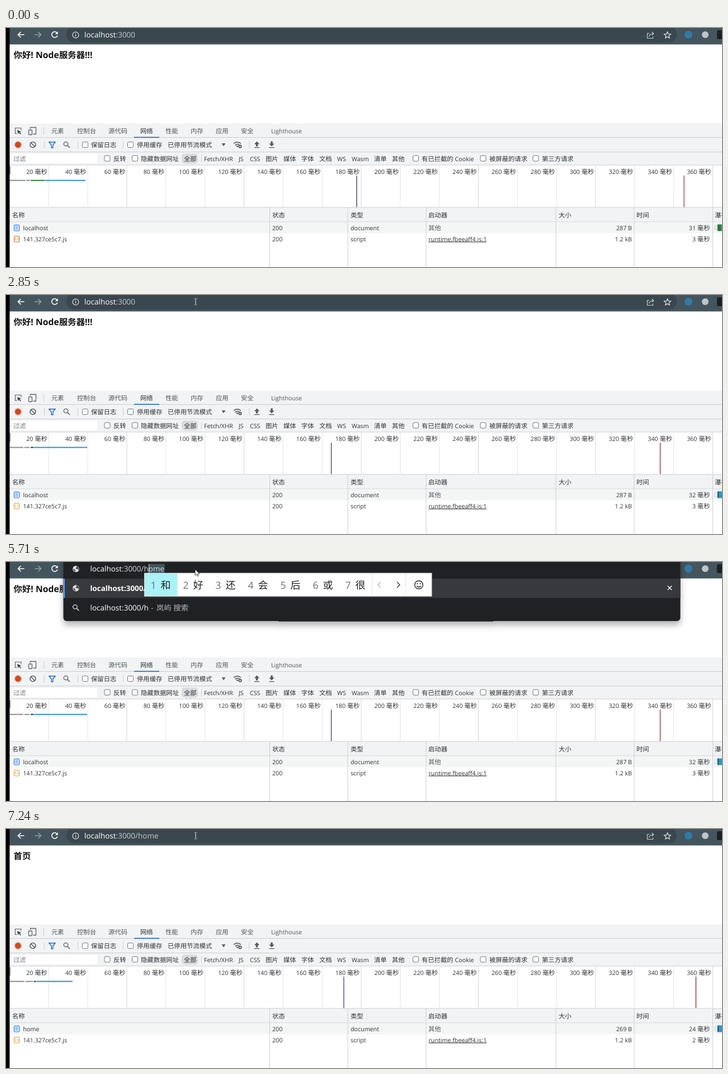
An HTML page for the animation above (8000 ms loop, 1280 by 429 pixels).

```html
<!DOCTYPE html>
<html lang="zh-CN">
<head>
<meta charset="utf-8">
<title>localhost:3000</title>
<style>
html, body { margin: 0; width: 100%; height: 100%; overflow: hidden; background: #fff; }
svg { display: block; width: 1280px; height: 429px; }
text { font-family: "Open Sans", "Noto Sans CJK SC", sans-serif; white-space: pre; text-rendering: geometricPrecision; }
</style>
</head>
<body>
<svg id="stage" viewBox="0 0 1280 429">
  <g id="base"></g>
  <g id="net"></g>
  <g id="page"></g>
  <g id="list"></g>
  <g id="bar"></g>
  <g id="ime"></g>
  <g id="pointer"></g>
  <rect width="6.5" height="429" fill="#000"/>
</svg>
<script>
const LOOP = 8000, INK = '#303236', RULE = '#cbced2', PALE = '#e8eaed', BLUE = '#a8cbf8';
const $ = id => document.getElementById(id);

// ---- drawing helpers
const rect = (x, y, w, h, fill, more = '') =>
  `<rect x="${x}" y="${y}" width="${w}" height="${h}" fill="${fill}" ${more}/>`;
const line = (d, color, width = 1, more = '') =>
  `<path d="${d}" fill="none" stroke="${color}" stroke-width="${width}" ${more}/>`;
const shape = (d, fill, more = '') => `<path d="${d}" fill="${fill}" ${more}/>`;
const dot = (x, y, r, fill, more = '') => `<circle cx="${x}" cy="${y}" r="${r}" fill="${fill}" ${more}/>`;
const ring = (x, y, r, color, width = 1.2) => dot(x, y, r, 'none', `stroke="${color}" stroke-width="${width}"`);
const vline = (x, y1, y2, color, width = 1) => line(`M${x} ${y1}V${y2}`, color, width);

// Latin and Chinese runs have slightly different sizes
const runs = (s, han) => s.split(/([\u3000-\u9fff\uff00-\uffef]+)/)
  .map((part, i) => i % 2 ? `<tspan font-size="${han}">${part}</tspan>` : part).join('');
const text = (x, y, s, { size = 10.7, han = 11.35, fill = INK, more = '' } = {}) =>
  `<text x="${x}" y="${y}" font-size="${size}" fill="${fill}" ${more}>${runs(s, han)}</text>`;
const label = (x, mid, s, fill = INK) => text(x, mid + 4, s, { fill });
const labelEnd = (x, mid, s, fill = INK) => text(x, mid + 4, s, { fill, more: 'text-anchor="end"' });

const ctx = document.createElement('canvas').getContext('2d');
const URL_SIZE = 13.5;
const urlWidth = s => {
  ctx.font = `${URL_SIZE}px "Open Sans", sans-serif`;
  ctx.textRendering = 'geometricPrecision';
  return ctx.measureText(s).width;
};

// ---- icons
const checkbox = (x, y) => rect(x + .5, y + .5, 10, 10, '#fff', 'rx="2" stroke="#767676"');
const lens = (x, y, c) => ring(x - 1.5, y - 1.5, 3.7, c, 1.3) + line(`M${x + 1.3} ${y + 1.3}l4.2 4.2`, c, 1.5);
const cross = (x, y, r, c, w) => line(`M${x - r} ${y - r}l${2 * r} ${2 * r}m0 ${-2 * r}l${-2 * r} ${2 * r}`, c, w);
const globe = (x, y) => dot(x, y, 5.8, '#dfe2e5') +
  shape(`M${x - 4.6} ${y - 1}l3 2.5 1.4 3.4-2.4-.6-2-2.6zM${x + .5} ${y - 5}l.6 2.6-2 1.2 1.6 1.2 2.6.2 1.6 2 .6-3.4-2.2-3.4z`, '#4b4e52');
const arrow = (x, y, dir, c) =>
  line(`M${x - 5.5 * dir} ${y}h${11 * dir}m${-5 * dir} -5l${5 * dir} 5l${-5 * dir} 5`, c, 1.6);
const reload = () => line('M91.6 9.2A5.2 5.2 0 1 0 92 13.6', '#fff', 1.6) + shape('M92.7 6.2v4.8h-4.8z', '#fff');
const info = () => ring(124.5, 12.5, 5.4, '#dfe5e8') + line('M124.5 11.6v3.6M124.5 9.3v1.3', '#dfe5e8', 1.3);
const share = () => line('M1150 9.5h-3.5v9h10v-3', '#c6ced2', 1.2) +
  line('M1149.5 15.5c.5-4 3-5.500 8-5.500m-3-3l3.300 3-3.300 3', '#c6ced2', 1.2);
const star = () => {
  const pts = Array.from({ length: 10 }, (_, i) => {
    const a = i * Math.PI / 5 - Math.PI / 2, r = i % 2 ? 2.8 : 6.2;
    return (1182.5 + r * Math.cos(a)).toFixed(1) + ' ' + (13 + r * Math.sin(a)).toFixed(1);
  });
  return line('M' + pts.join('L') + 'z', '#e6ebed', 1.2);
};
const fileIcon = (y, script, tint) => {
  const c = script ? tint : '#1a73e8';
  return rect(14.6, y - 5, 9, 10.5, '#fff', `rx="1.500" stroke="${c}" stroke-width="1.200"`) + (script
    ? line(`M18 ${y - 1.5}l-1.700 1.800 1.700 1.800m2.200 -3.600l1.700 1.800-1.700 1.800`, c)
    : line(`M16.5 ${y - 2.5}h5m-5 2.500h5m-5 2.500h5`, c));
};

// ---- unchanging browser and tool panels
function drawBase() {
  let s = rect(0, 0, 1280, 429, '#fff') + rect(0, 0, 1280, 29.5, '#45555d');
  s += arrow(27, 12, -1, '#fff') + arrow(57, 12, 1, '#93a1a8');
  s += dot(1220, 12, 7, '#2f7ba8') + dot(1250, 12, 6, '#bcc5c9') + rect(1271, 4, 16, 16, '#1d2023', 'rx="3"');

  s += rect(0, 171.5, 1280, 74.5, '#f1f3f4') + rect(0, 322, 1280, 26, '#f1f3f4');
  for (const y of [196.5, 222.5, 246, 322, 348]) s += line(`M0 ${y}H1280`, RULE);

  const tabs = { 81: '元素', 127: '控制台', 183: '源代码', 285: '性能', 330: '内存', 375: '应用', 420: '安全', 474: 'Lighthouse' };
  for (const x in tabs) s += label(x, 185, tabs[x], '#53575b');
  s += label(240, 185, '网络') + rect(229, 195.5, 45, 1.6, '#1a62c8');
  s += line('M19.500 189.500h-3v-10h10.500v3.500', '#5f6368', 1.2) + shape('M20 183l7.500 3-3 1 2.500 3-1.300 1-2.500-3-1.700 2.500z', '#45494d');
  s += line('M43.500 181v-2.500h10v12h-5', '#5f6368', 1.3) + rect(40.5, 183, 6, 8.5, '#f1f3f4', 'rx="1" stroke="#5f6368" stroke-width="1.300"');

  s += dot(21.5, 209.5, 7, '#efc9bd') + dot(21.5, 209.5, 5.4, '#cf4a22');
  s += ring(48, 209.5, 5, '#55595d', 1.5) + line('M44.500 206l7 7', '#55595d', 1.5);
  s += line('M77 204.700h11l-4.200 5.300v5h-2.600v-5z', '#1a66d0', 1.4) + lens(108.5, 209.5, '#55595d');
  s += checkbox(136, 204) + label(152, 209.5, '保留日志') + checkbox(217, 204) + label(234, 209.5, '停用缓存');
  s += label(289, 209.5, '已停用节流模式') + shape('M385.500 207h7l-3.500 5.500z', '#5f6368');
  s += line('M407 207.500q6.500-5.500 13 0m-10.500 2.800q4-3.200 7.500-.5', '#4d5155', 1.5) +
    shape('M411 211.500l3 3 1-3.500z', '#4d5155') + ring(418.5, 212.5, 2.2, '#4d5155', 1.8);
  s += shape('M448.500 203.500l4.700 5h-3v4h-3.400v-4h-3zM443.800 214h9.400v1.300h-9.400z', '#55595d');
  s += shape('M475 212.500l4.700-5h-3v-4h-3.400v4h-3zM470.300 214h9.400v1.300h-9.400z', '#55595d');
  s += vline(67.5, 178, 192, RULE);
  for (const x of [68.5, 128.5, 209.5, 435]) s += vline(x, 203, 216, RULE);

  s += rect(10, 226, 153, 17, '#fff') + label(13, 234.5, '过滤', '#75797d');
  s += rect(314, 225.5, 29, 18, '#dadcde', 'rx="5"') + vline(349.5, 228, 241, RULE);
  for (const x of [175.5, 225, 727, 847.5, 941.5]) s += checkbox(x, 228.5);
  const kinds = {
    192: '反转', 241: '隐藏数据网址', 318: '全部', 354: 'Fetch/XHR', 416: 'JS', 436: 'CSS', 464: '图片', 496: '媒体',
    528: '字体', 560: '文档', 592: 'WS', 618: 'Wasm', 658: '清单', 690: '其他',
    743: '有已拦截的 Cookie', 864: '被屏蔽的请求', 958: '第三方请求'
  };
  for (const x in kinds) s += label(x, 234.5, kinds[x]);

  const heads = { 11: '名称', 476: '状态', 616: '类型', 755: '启动器', 988: '大小', 1127: '时间', 1267: '瀑布' };
  for (const x in heads) s += label(x, 336, heads[x]);
  return s;
}

// ---- network log: times in ms, bars as [from, to, colour]
const doc = (name, size, time, status = '200') => [name, status, 'document', '其他', size, time];
const js = time => ['141.327ce5c7.js', '200', 'script', 'runtime.fbeeaff4.js:1', '1.2 kB', time];
const GREY = '#8a8d90', SKY = '#2b8fd0', GREEN = '#2a7a32';
const logs = [
  { dcl: 177.7, load: 345.3, script: 399, tint: '#e0691e', cols: ['#45546c', '#b0564c'], body: GREEN, head: 6,
    bars: [[0, 8, GREY], [8.4, 10.4, GREY], [10.7, 18, GREEN], [18.2, 38.8, SKY]],
    rows: [doc('localhost', '287 B', '31 毫秒'), js('3 毫秒')] },
  { dcl: 164.7, load: 333.1, script: 391, tint: '#dfa13a', cols: ['#504f9c', '#a4454a'], body: '#20505c', head: 2,
    bars: [[0, 7, GREY], [7.5, 10.2, GREY], [10.7, 12.2, '#1d3a2b'], [12.4, 39.7, SKY]],
    rows: [doc('localhost', '287 B', '32 毫秒'), js('3 毫秒')] },
  { dcl: 171.1, load: 351.4, script: 400, tint: '#dfa13a', cols: ['#5654bd', '#8f4044'], body: '#20505c', head: 2,
    bars: [[0, 7.6, GREY], [8.1, 11.9, GREY], [12.4, 13.7, '#1d4a2b'], [13.9, 32.2, SKY]],
    rows: [doc('home', '269 B', '24 毫秒'), js('2 毫秒')] }
];

function drawNet({ log, unit, gap, extra, seen }) {
  const L = logs[log], at = ms => 6.5 + ms / unit * gap, wide = unit > 20;
  const bar = (from, to, color) => rect(at(from), 272.6, at(to) - at(from), 2, color);
  let s = '';
  for (let k = 1; at((k - 1) * unit) < 1280; k++) {
    const x = at(k * unit);
    s += vline(x, 246, 321.5, k % 3 ? '#e3e5e7' : '#d3d5d8') + labelEnd(x - 2.5, 258, k * unit + ' 毫秒');
  }
  s += rect(6, 248, 2.2, 15, '#9b9ea1');
  if (wide) s += bar(7, 38, '#3f8fd6') + rect(at(L.script), 270, 1.2, 1.6, '#7aa6d4');
  else for (const b of L.bars) s += bar(...b);
  const cols = wide ? [log ? '#45466c' : '#3c7bd0', log ? '#b4573a' : '#93483f'] : L.cols;
  if (seen >= L.dcl) s += vline(at(L.dcl), 265, 321.5, cols[0], 1.5);
  if (seen >= L.load) s += vline(at(L.load), 265, 321.5, cols[1], 1.5);

  const rows = L.rows.slice(0, seen >= L.script ? 2 : 1).concat(extra ? [extra] : []);
  rows.forEach(([name, status, type, from, size, time], i) => {
    const y = 358.5 + 20 * i, script = type === 'script';
    if (i % 2 === 0) s += rect(7, y - 10, 1273, 20, '#f4f5f5');
    s += fileIcon(y, script, L.tint) + label(30.5, y, name) + label(476, y, status) + label(616, y, type);
    s += script ? text(755.5, y + 4, from, { more: 'text-decoration="underline"' }) : label(755, y, from, '#55595d');
    s += labelEnd(1119, y, size) + labelEnd(1258.5, y, time, time === '待处理' ? '#55595d' : INK);
  });
  for (const x of [471.5, 611, 751, 983, 1123, 1263.5]) s += vline(x, 322, 429, RULE);

  if (!wide) s += rect(1267.5, 355, 3.5, 7, '#fff', `stroke="#c3c6c9"`) +
    rect(1272, 352.5, L.head, 12, L.body) + rect(1272 + L.head, 352.5, 10, 12, '#1d9bdb');
  else if (log) s += rect(1269.5, 352.5, 3, 11, '#3f8fd6') + vline(1273.5, 349, 429, '#79a7de');
  else s += vline(1271, 349, 429, '#4a86d0', 1.3) + vline(1274, 349, 429, '#a8625a', 1.3) +
    rect(1268, 355, 2, 7, '#c3d6ea') + rect(1275, 373, 2.5, 11, '#4a90d8');
  return s;
}

// ---- address bar
function drawBar({ url, focus, caret, sel, edit, busy, press }) {
  let s = busy ? cross(87, 12, 4.7, '#fff', 1.6) : reload();
  s += rect(108, -3, 1091, 29, focus ? '#202124' : '#3a474e',
    `rx="14" ${focus && !edit ? 'stroke="#a5c6ee" stroke-width="1.800"' : ''}`);
  s += edit ? globe(125, 12.5) : info() + share() + star();
  const x = edit ? 150.5 : 140;
  if (sel) {
    const skip = sel[0] ? urlWidth(url.slice(0, sel[0])) + 1 : 0;
    s += rect(x + skip, 3.5, urlWidth(url) + .5 - skip, 18, '#3d555d');
  }
  const gray = edit ? '#d3d7da' : '#c3cbcf';
  s += `<text x="${x}" y="17" font-size="${URL_SIZE}" fill="#fff">localhost<tspan fill="${gray}">${url.slice(9)}</tspan></text>`;
  if (caret != null) s += vline(x + urlWidth(url.slice(0, caret)) + .8, 4, 20, '#e4e7e9', 1);
  if (press) s += dot(337.5, 12, 11.3, '#938f17');
  return s;
}

// ---- suggestions: each row is [icon, [text, style] ...]
const HOST = 'localhost:3000';
const styles = {
  b: 'font-weight="700" font-size="13.300" fill="#fff"', n: 'fill="#fff"', g: 'fill="#b4b8bc"',
  dash: 'fill="#b4b8bc" letter-spacing=".9"',
  B: `font-weight="700" font-size="13.300" fill="${BLUE}"`, l: `fill="${BLUE}"`
};
const DASH = [' - ', 'dash'];
const seek = q => ['lens', [q, 'n'], DASH, ['岚屿 搜索', 'g']];
const page = p => ['globe', [HOST + '/', 'b'], [p, 'n'], DASH, [HOST + '/', 'B'], [p, 'l']];
const pick = p => ['globe', [HOST + p, 'b'], DASH, [HOST + p, 'B']];
const rootList = [pick(''), seek(HOST + '/'), page('home'), page('list')];
const homeList = q => [pick('/home'), seek(HOST + q)];

function drawList({ list, fade }) {
  if (!list) return '';
  const bottom = list.length > 2 ? 176 : 106;
  let s = rect(102.5, -20, 1103, bottom + 20, '#202124', 'rx="6"') +
    rect(102.5, 30, 1103, 34.5, '#38393c') + rect(102.5, 30, 2.6, 34.5, '#5b9df5');
  if (bottom < 150) s += rect(487, 105.5, 384, 1.2, '#17181a');
  list.forEach(([icon, ...parts], i) => {
    const y = 47 + 35 * i;
    s += icon === 'lens' ? lens(125, y, '#dfe2e5') : globe(125, y);
    s += `<text x="150.500" y="${y + 5}" font-size="13.500">` +
      parts.map(([t, k]) => `<tspan ${styles[k]}>${t}</tspan>`).join('') + '</text>';
  });
  s += cross(1186.5, 46.5, 3.7, '#fff', 1.4);
  return `<g opacity="${fade}" style="filter:drop-shadow(0 7px 6px rgba(0,0,0,.3))">${s}</g>`;
}

function drawIme({ ime }) {
  if (!ime) return '';
  let s = rect(247.5, 20, 513.5, 41.5, '#fff', 'stroke="#d5d7d9"') + rect(248, 20.5, 58, 40.5, '#aaf2f6');
  [...'和好还会后或很'].forEach((c, i) => {
    s += text(258.5 + 58 * i, 48, String(i + 1), { size: 17.5, fill: '#6d7073' }) +
      text(276.5 + 58 * i, 48, c, { han: 18, fill: '#222' });
  });
  s += vline(654.5, 21, 61, '#e3e4e5') + vline(714.5, 21, 61, '#e3e4e5');
  s += line('M670 36l-5 5 5 5', '#b5b7b9', 1.4) + line('M699 36l5 5-5 5', '#333', 1.4);
  s += ring(738, 41, 7.3, '#222', 1.4) + dot(735.4, 39, 1.1, '#222') + dot(740.6, 39, 1.1, '#222') +
    line('M734 43q4 4 8 0', '#222', 1.3);
  return s;
}

const drawPage = ({ title }) => text(13.5, 53.5, title, { size: 15.8, han: 15.4, fill: '#111', more: 'font-weight="700"' });

// ---- pointer
const ARROW = shape('M0 0V11.200L2.600 8.800L4.300 12.600L6.100 11.800L4.500 8.100H8z', '#fff', 'stroke="#111" stroke-width=".8"');
const BEAM = line('M-2.500 -6q2.500 0 2.500 1.500v9q0 1.500 -2.500 1.500M2.500 -6q-2.500 0 -2.500 1.500v9q0 1.500 2.500 1.500', '#b9c1c5', .9);

function drawPointer(t) {
  if (t < 130) return '';
  const put = (x, y, s) => `<g transform="translate(${x.toFixed(1)} ${y.toFixed(1)})">${s}</g>`;
  if (t < 970) {
    const p = Math.floor((t - 130) / 70) / 11, e = p * p * (3 - 2 * p);
    return put(1165 - 823 * e, 382 - 354 * e, ARROW);
  }
  if (t < 1040) return put(341, 18, BEAM);
  return t >= 5710 && t < 6910 ? put(338, 13, ARROW) : put(339, 12, BEAM);
}

// ---- timeline of changes; each entry adds to the state before it
const FAST = { unit: 20, gap: 69.83, extra: null };
const ALL = [0], N = HOST.length;
const down = { focus: 1, press: 1, caret: N }, up = { press: 0, caret: null, sel: ALL };
const leave = { focus: 0, edit: 0, caret: null, sel: null, busy: 1 };
const load = (start, marks) => marks.map((seen, i) => [start + i * 66, { seen }]);
const typed = (n, more) => ({ url: HOST + '/home', caret: N + 1 + n, sel: n < 4 ? [N + 1 + n] : null,
  list: homeList('/' + 'home'.slice(0, n)), ...more });

const steps = [
  [0, { url: HOST, title: '你好! Node服务器!!!', log: 0, seen: 500, fade: 1, ...FAST }],
  [1510, down],
  [1580, up],
  [2450, { ...leave, unit: 500, gap: 76.8, extra: doc('localhost', '0 B', '待处理', '（待处理）') }],
  [2520, { log: 1, ...FAST }],
  ...load(2520, [60, 130, 200, 280, 340, 500]),
  [2850, { busy: 0 }],
  [4180, down],
  [4250, up],
  [4980, { sel: null, caret: N }],
  [5310, { url: HOST + '/', edit: 1, caret: N + 1, list: rootList, fade: .62 }],
  [5380, { fade: 1 }],
  [5710, typed(1, { ime: 1 })],
  [6040, typed(2)],
  [6110, typed(3)],
  [6250, typed(4)],
  [6320, { ime: 0 }],
  [6850, { ...leave, fade: .38, unit: 500, gap: 150.1, extra: doc('home', '170 B', '待处理') }],
  [6910, { title: '首页', list: null, log: 2, ...FAST }],
  ...load(6910, [60, 130, 200, 280, 360, 500]),
  [7240, { busy: 0 }]
];

const parts = { net: drawNet, page: drawPage, list: drawList, bar: drawBar, ime: drawIme };
const shown = {};
function put(id, s) {
  if (shown[id] !== s) $(id).innerHTML = shown[id] = s;
}

let last = -1;
function render(t) {
  const now = steps.filter(([at]) => at <= t);
  if (now.length !== last) {
    last = now.length;
    const state = Object.assign({}, ...now.map(([, change]) => change));
    for (const id in parts) put(id, parts[id](state));
  }
  put('pointer', drawPointer(t));
}

put('base', drawBase());
const began = performance.now();
function tick() {
  render((performance.now() - began) % LOOP);
  requestAnimationFrame(tick);
}
tick();
</script>
</body>
</html>
```
